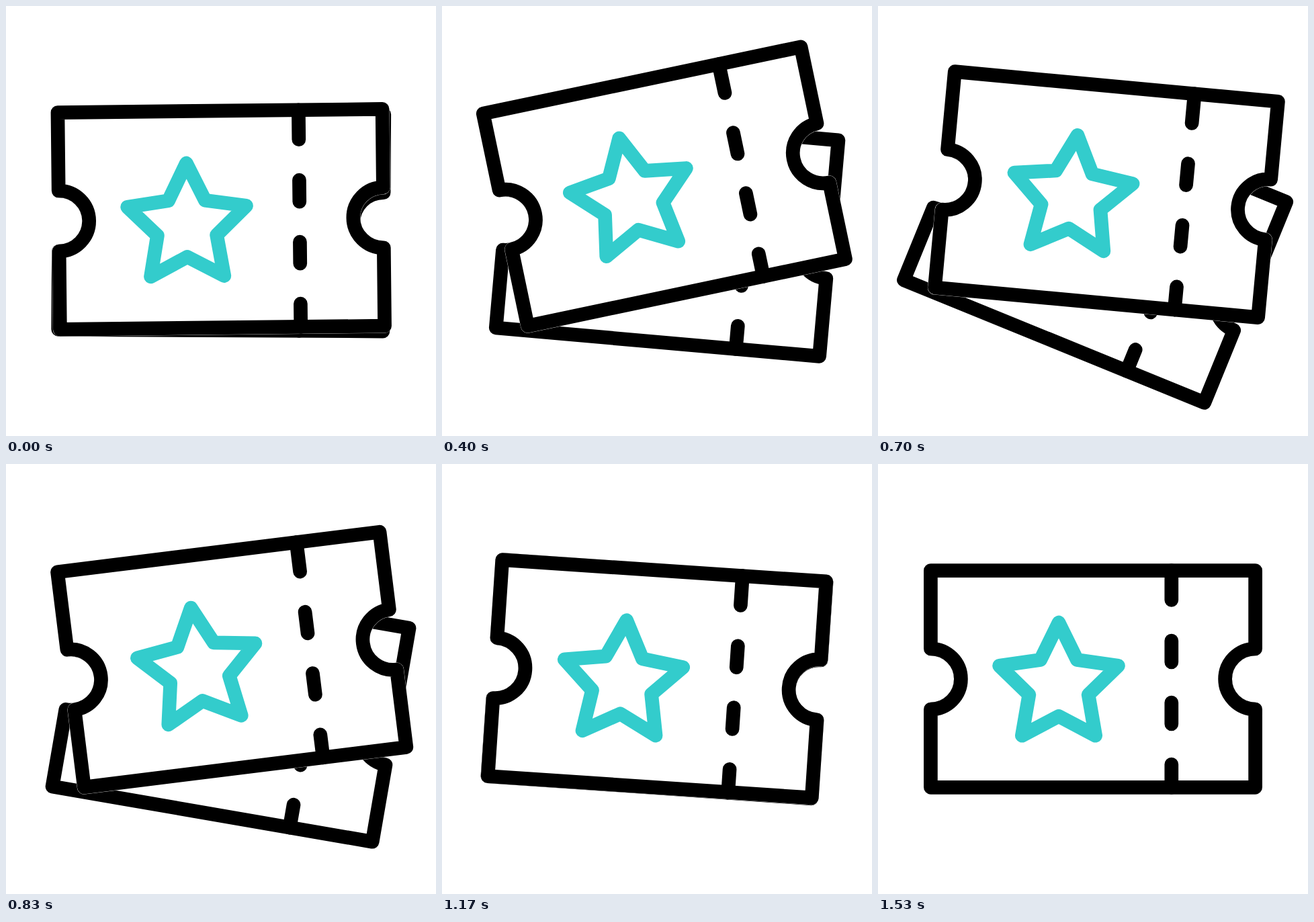
An HTML page for the animation above (1.67 s loop, 640 px wide and 640 px high).

```html
<!DOCTYPE html>
<html lang="en">
<head>
<meta charset="utf-8">
<title>Tickets</title>
<style>
  html, body { margin: 0; width: 100%; height: 100%; overflow: hidden; background: #fff; }
  svg { display: block; width: 100vw; height: 100vh; }
  .edge { fill: #fff; stroke: #fff; stroke-width: 21.2; }
  .line { fill: none; stroke: #000; stroke-width: 20.7; }
  .star { stroke: #3cc; }
  path { stroke-linecap: round; stroke-linejoin: round; }
</style>
</head>
<body>
<svg viewBox="0 0 640 640">
  <defs>
    <path id="outline" d="M78.4 158.6H561.6V275A45 45 0 0 0 561.6 365V481.3H78.4V365A45 45 0 0 0 78.4 275Z"/>
    <g id="ticket">
      <use href="#outline" class="edge"/>
      <use href="#outline" class="line"/>
      <path class="line" d="M436.8 158.6V202.5M436.8 263V295M436.8 355V387M436.8 447V481.3"/>
    </g>
  </defs>
  <g id="pair">
    <use id="back" href="#ticket"/>
    <g id="front">
      <use href="#ticket"/>
      <path id="star" class="line star"/>
    </g>
  </g>
</svg>
<script>
  const LOOP = 1670, STEP = 100 / 3, LAST = 47;
  const [pair, back, front, star] =
    ['pair', 'back', 'front', 'star'].map(id => document.getElementById(id));

  function starPath(cx, cy, outer, inner) {
    const points = Array.from({ length: 10 }, (_, i) => {
      const r = i % 2 ? inner : outer, a = i * Math.PI / 5;
      return `${cx + r * Math.sin(a)} ${cy - r * Math.cos(a)}`;
    });
    return `M${points.join('L')}Z`;
  }
  star.setAttribute('d', starPath(269, 329, 93, 46.4));

  // 0 before step a, 1 after step b, eased in and out between
  function ease(n, a, b) {
    const x = Math.min(1, Math.max(0, (n - a) / (b - a)));
    return x * x * (3 - 2 * x);
  }

  const fan = n => ease(n, 0, 7) - ease(n, 25.8, 36.5);
  const swing = n => -9.2 * ease(n, 1, 11) + 37.9 * ease(n, 11, 17.6)
    - 24.8 * ease(n, 18, 26) - 3.9 * ease(n, 36, LAST);
  const shiftX = n => 16 * ease(n, 0, 13) - 11 * ease(n, 13, 18)
    + 12.5 * ease(n, 18, 26) - 17.5 * ease(n, 26, 35.5);
  const shiftY = n => -6 * ease(n, 8, 11) + 3 * ease(n, 11, 18)
    + 20.5 * ease(n, 18.5, 26) - 17.5 * ease(n, 27, 36.5);

  const setTransform = (el, value) => el.setAttribute('transform', value);

  function draw(ms) {
    const n = Math.min(LAST, Math.floor((ms % LOOP + 5) / STEP) + 1);
    setTransform(pair, `translate(${shiftX(n)} ${shiftY(n)}) rotate(${swing(n)} 320 320)`);
    // both tickets fan out around the middle of their left side
    setTransform(front, `rotate(${-11 * fan(n)} 78 320)`);
    setTransform(back, `rotate(${5.9 * fan(n)} 78 320)`);
  }

  const start = performance.now();
  function tick() {
    draw(performance.now() - start);
    requestAnimationFrame(tick);
  }
  tick();
</script>
</body>
</html>
```
